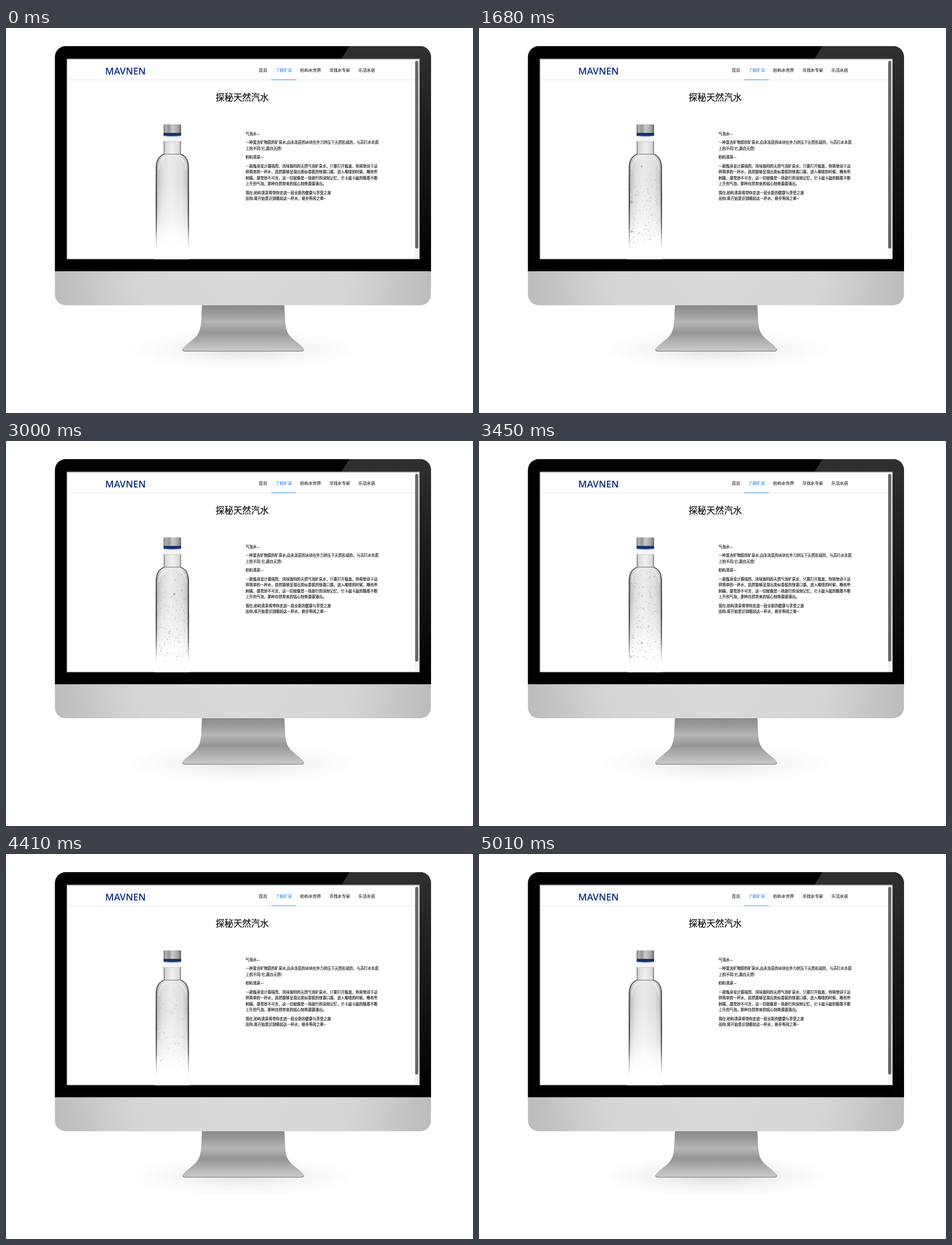
An HTML page that plays this animation: 824 px wide and 679 px high, repeating every 5.13 s.

```html
<!DOCTYPE html>
<html>
<head>
<meta charset="utf-8">
<style>
  html, body { margin: 0; width: 100%; height: 100%; overflow: hidden; background: #fff; }
  svg { display: block; width: 824px; height: 679px; }
  text { font-family: "Noto Sans CJK SC", "Noto Sans CJK", "Noto Sans", sans-serif; }
  .brand { font: 600 16.7px "Open Sans", sans-serif; fill: #0c2f82; }
  .nav { font-size: 7.4px; fill: #1c1c1c; stroke: #1c1c1c; stroke-width: .12; }
  .nav .on { fill: #3d94f5; stroke: #3d94f5; }
  .title { font-size: 15.6px; fill: #0c0c0c; stroke: #0c0c0c; stroke-width: .2; }
  .copy { font-size: 6.48px; fill: #1a1a1a; stroke: #1a1a1a; stroke-width: .16; }
</style>
</head>
<body>
<svg viewBox="0 0 824 679" xmlns="http://www.w3.org/2000/svg">
  <defs>
    <clipPath id="caseClip"><rect x="86.3" y="32" width="663.5" height="457" rx="19"/></clipPath>
    <clipPath id="waterClip"><path d="M280 200V222C271 226 266 233 266 246V389H321.5V246C321.5 233 316 226 307 222V200Z"/></clipPath>
    <linearGradient id="glare" x2="0" y2="1">
      <stop stop-color="#303030"/><stop offset=".35" stop-color="#1e1e1e"/><stop offset="1" stop-color="#000"/>
    </linearGradient>
    <radialGradient id="chin" gradientUnits="userSpaceOnUse" cx="418" cy="425" r="345">
      <stop stop-color="#dadada"/><stop offset=".55" stop-color="#d6d6d6"/><stop offset="1" stop-color="#bababa"/>
    </radialGradient>
    <linearGradient id="stand" x2="0" y2="1">
      <stop stop-color="#868686"/><stop offset=".15" stop-color="#969696"/><stop offset=".38" stop-color="#b5b5b5"/>
      <stop offset=".6" stop-color="#959595"/><stop offset=".78" stop-color="#b0b0b0"/><stop offset="1" stop-color="#cbcbcb"/>
    </linearGradient>
    <radialGradient id="shade">
      <stop stop-color="#000" stop-opacity=".14"/><stop offset=".5" stop-color="#000" stop-opacity=".05"/>
      <stop offset="1" stop-color="#000" stop-opacity="0"/>
    </radialGradient>
    <linearGradient id="cap">
      <stop stop-color="#777"/><stop offset=".12" stop-color="#b5b5b5"/><stop offset=".3" stop-color="#939595"/>
      <stop offset=".5" stop-color="#c9c9c9"/><stop offset=".8" stop-color="#a8a8a8"/><stop offset="1" stop-color="#6c6c6c"/>
    </linearGradient>
    <linearGradient id="glass">
      <stop stop-color="#8a8a8a"/><stop offset=".07" stop-color="#c4c4c4"/><stop offset=".2" stop-color="#dfdfdf"/>
      <stop offset=".45" stop-color="#ebebeb"/><stop offset=".8" stop-color="#dedede"/>
      <stop offset=".93" stop-color="#c8c8c8"/><stop offset="1" stop-color="#888"/>
    </linearGradient>
    <linearGradient id="neck">
      <stop stop-color="#666"/><stop offset=".09" stop-color="#d8d8d8"/><stop offset=".5" stop-color="#f0f0f0"/>
      <stop offset=".91" stop-color="#d8d8d8"/><stop offset="1" stop-color="#666"/>
    </linearGradient>
    <linearGradient id="haze" gradientUnits="userSpaceOnUse" x1="0" y1="270" x2="0" y2="390">
      <stop stop-color="#fff" stop-opacity="0"/><stop offset=".45" stop-color="#fff" stop-opacity=".4"/>
      <stop offset=".8" stop-color="#fff" stop-opacity=".9"/><stop offset="1" stop-color="#fff"/>
    </linearGradient>
    <linearGradient id="edge" gradientUnits="userSpaceOnUse" x1="0" y1="222" x2="0" y2="394">
      <stop stop-color="#5a5a5a"/><stop offset=".5" stop-color="#2c2c2c"/>
      <stop offset=".75" stop-color="#444" stop-opacity=".8"/><stop offset="1" stop-color="#999" stop-opacity="0"/>
    </linearGradient>
  </defs>

  <ellipse id="shadow" cx="418" cy="568" rx="205" ry="37" fill="url(#shade)"/>
  <path d="M346 487H491C493 510 491 527 498 539C504 549 519 557 525 565Q527 571 521 571H316Q310 571 312 565C318 557 333 549 339 539C346 527 344 510 346 487Z" fill="url(#stand)"/>
  <path d="M311.8 566.5Q312 570 316 570H521Q525 570 525.2 566.5" fill="none" stroke="#808080" stroke-width="1.2"/>

  <g clip-path="url(#caseClip)">
    <path d="M86 32H750V429H86Z"/>
    <path d="M606 32H750V429H730V54H592Z" fill="url(#glare)"/>
    <path d="M86 429H750V489H86Z" fill="url(#chin)"/>
  </g>
  <rect x="107" y="54" width="623" height="354" fill="#a2a2a2"/>
  <rect x="108.3" y="55.7" width="620.7" height="351" fill="#fff"/>
  <path d="M262 405H324V408H262Z" fill="#fff"/>
  <path d="M108.5 91.5H721" stroke="#e8e8e8"/>
  <path d="M468 91.4H511.5" stroke="#5ba2ee" stroke-width="1.2"/>
  <path d="M721 56H729V406.5H721Z" fill="#f3f3f3"/>
  <rect x="722" y="58" width="5.4" height="331" rx="2.7" fill="#666"/>

  <text class="brand" x="175" y="82">MAVNEN</text>
  <g class="nav">
    <text x="446" y="77.3">首页</text>
    <text class="on" x="475.3" y="77.3">了解矿泉</text>
    <text x="519" y="77.3">柏屿水世界</text>
    <text x="570.3" y="77.3">寻找水专家</text>
    <text x="621.8" y="77.3">乐活水居</text>
  </g>
  <text class="title" x="370" y="127.6">探秘天然汽水</text>
  <g class="copy" id="copy"></g>

  <path d="M264.5 402V246C264.5 233 269 225.5 278.5 222H308.5C318 225.5 322.5 233 322.5 246V402Z" fill="url(#glass)"/>
  <path d="M269.5 250Q270 233 283 227M317.5 250Q317 233 304 227" fill="none" stroke="#fff" stroke-width="2" opacity=".45"/>
  <path d="M262 270H325V405H262Z" fill="url(#haze)"/>
  <path d="M265.2 402V246C265.2 233 269.5 226 279 222.5M308 222.5C317.5 226 321.9 233 321.9 246V402" fill="none" stroke="url(#edge)" stroke-width="1.8"/>
  <path d="M278.3 199H308.7V223H278.3Z" fill="url(#neck)"/>
  <path d="M279 191H308V200H279Z" fill="#f4f5f6"/>
  <path d="M279 200.3H308" stroke="#bdbdbd" stroke-width=".8"/>
  <path d="M279 222.4H308" stroke="#777"/>
  <rect x="278" y="170" width="31" height="16" rx="1.5" fill="url(#cap)"/>
  <path d="M278 185H309V190Q293.5 191.6 278 190Z" fill="#123273"/>
  <path d="M278.5 191Q293.5 192.6 308.5 191" fill="none" stroke="#aeb4c0" stroke-width=".9"/>

  <g id="bubbles" clip-path="url(#waterClip)" fill="#fff" fill-opacity=".15" stroke="#6d6d6d"></g>
</svg>

<script>
const LOOP = 5130, STEP = 30, FLOOR = 390;
const SVG = "http://www.w3.org/2000/svg";
const $ = id => document.getElementById(id);

function add(parent, tag, attrs, text) {
  const node = document.createElementNS(SVG, tag);
  for (const key in attrs) node.setAttribute(key, attrs[key]);
  if (text) node.textContent = text;
  return parent.appendChild(node);
}

const copy = [
  [188.6, "气泡水—"],
  [204.3, "一种富含矿物质的矿泉水,由永冻层的冰块在外力挤压下天然形成的，与苏打水本质"],
  [214.6, "上的不同:它,源自天然!"],
  [230.4, "柏屿清泉—"],
  [245.9, "一款瓶身设计感强烈、风味独特的天然气泡矿泉水，只要打开瓶盖，你将惊讶于这"],
  [256.3, "样简单的一杯水，居然能够呈现出类似香槟的惊喜口感，进入喉咙的时候，略有些"],
  [266.7, "刺痛，感觉妙不可言，这一切就像是一场旅行的深刻记忆，它卡兹卡兹的随着不断"],
  [277.1, "上升的气泡，那种自然带来的铭心刻骨源源涌出。"],
  [292.6, "现在,柏屿清泉将带你走进一段全新的健康与享受之旅"],
  [302.8, "而你,将开始意识到眼前这一杯水，绝非等闲之辈~"]
];
for (const [y, line] of copy) add($("copy"), "text", { x: 422.8, y }, line);

const rand = n => {
  const s = Math.sin(n * 12.9898 + 4.137) * 43758.5453;
  return s - Math.floor(s);
};
const clamp = v => Math.max(0, Math.min(1, v));

// Linear interpolation through [time, value] points.
function ramp(points, t) {
  for (let i = 1; i < points.length; i++) {
    const [t0, v0] = points[i - 1], [t1, v1] = points[i];
    if (t < t1) return v0 + (v1 - v0) * clamp((t - t0) / (t1 - t0));
  }
  return points[points.length - 1][1];
}

const density = [[100, 0], [600, .2], [1500, .72], [2500, .85], [3300, 1], [3900, .65], [4500, .22], [4900, .04], [5010, 0]];
const reach = [[100, 75], [900, 95], [1700, 118], [2500, 142], [3400, 165], [4000, 140], [4900, 120]];

// Larger bubbles: time, x and y of the middle of the rise, radius.
const large = [
  [700, 281, 345, 1.4], [1250, 304, 318, 1.3], [1680, 287, 244, 1.1], [1680, 269, 307, 1.5],
  [1680, 269, 359, 1.3], [2100, 300, 330, 1.5], [2520, 289, 235, 1.6], [2520, 281, 343, 1.9],
  [3000, 297, 270, 1.3], [3450, 267, 380, 1.6], [3450, 287, 356, 1.2], [4020, 292, 304, 2.8],
  [4020, 287, 368, 1.6], [4020, 312, 349, 1.3], [4830, 283, 364, 2.6], [4830, 277, 313, 1.6],
  [4830, 312, 345, 1.5], [4830, 269, 384, 1.8]
];

const newBubble = () => add($("bubbles"), "circle", {});
const small = Array.from({ length: 200 }, newBubble);
const big = large.map(newBubble);

function place(node, x, y, r, alpha) {
  node.setAttribute("cx", x.toFixed(2));
  node.setAttribute("cy", y.toFixed(2));
  node.setAttribute("r", r);
  node.setAttribute("stroke-width", r > 1 ? .75 : .4);
  node.setAttribute("opacity", alpha.toFixed(2));
}

function drawSmall(node, i, t, fade) {
  const life = 500 + 500 * rand(i + .3);
  const clock = t + life * rand(i + .6);
  const cycle = Math.floor(clock / life);
  const age = clock - cycle * life;
  const seed = i * 17 + cycle * 5.31;
  const born = t - age;
  const shown = rand(seed + 1) < ramp(density, born + life / 2);
  const height = ramp(reach, born + life / 2) * rand(seed + 2) ** 1.35;
  const y = FLOOR + 8 - height - age * (.015 + .04 * rand(seed + 3));
  const x = 267 + 54 * rand(seed + 4) + .5 * Math.sin(age / 90 + i);
  const r = .3 + .6 * rand(seed + 5) ** 3;
  const envelope = clamp(age / 90) * clamp((life - age) / 90);
  place(node, x, y, r, shown ? .75 * envelope * fade : 0);
}

function drawLarge(node, [mid, x, y, r], t, fade) {
  const d = t - mid;
  place(node, x + .6 * Math.sin(d / 120), y - d * .065, r, clamp((420 - Math.abs(d)) / 120) * fade);
}

function render(time) {
  const t = Math.min(5010, Math.floor(time / STEP) * STEP);
  const fade = t < 120 ? 0 : clamp((5010 - t) / 90);
  small.forEach((node, i) => drawSmall(node, i, t, fade));
  big.forEach((node, i) => drawLarge(node, large[i], t, fade));
  $("shadow").setAttribute("opacity", t >= 4950 ? 1 : .75);
}

const start = performance.now();
function tick() {
  render((performance.now() - start) % LOOP);
  requestAnimationFrame(tick);
}
tick();
</script>
</body>
</html>
```
